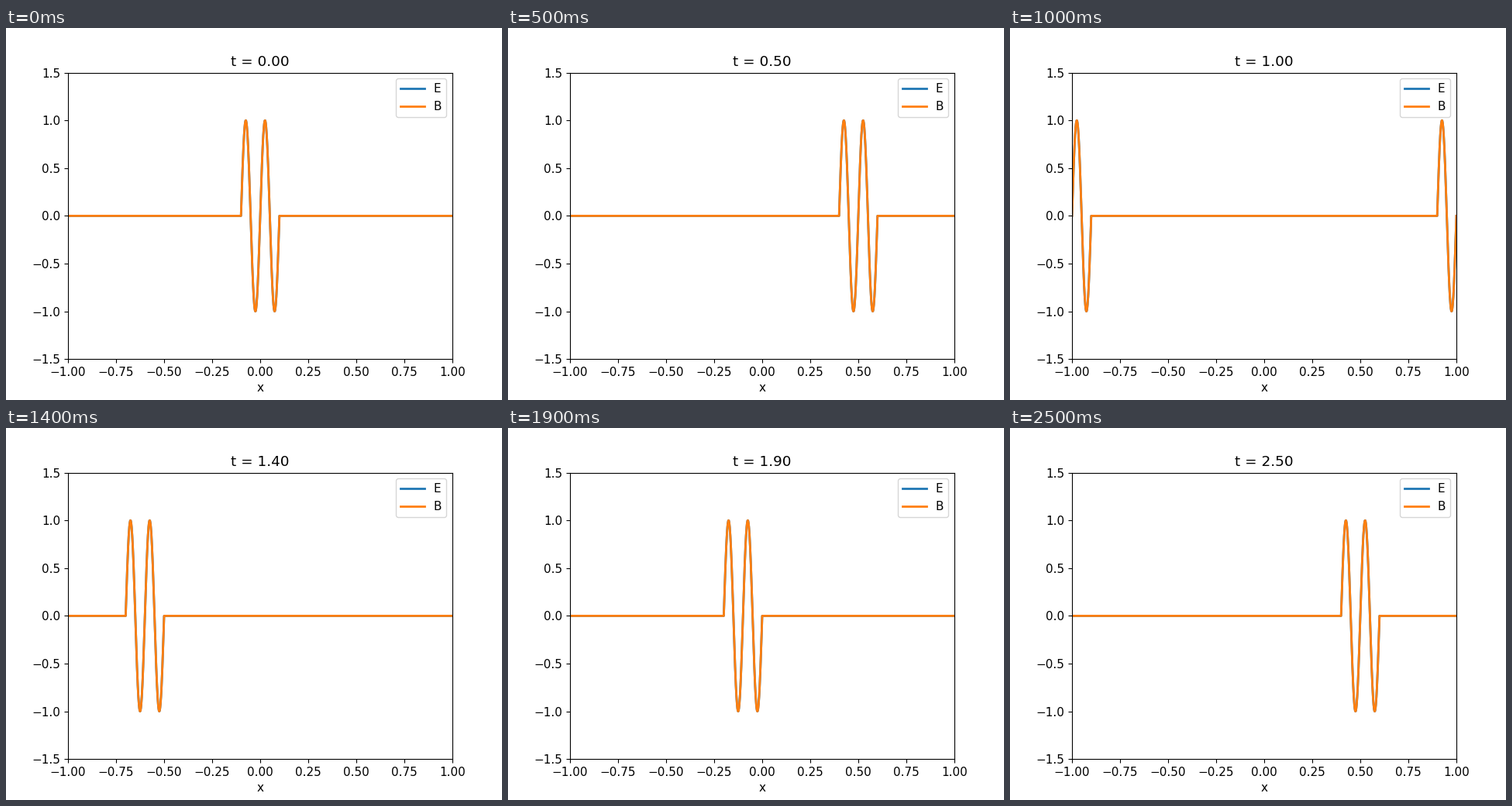
These frames come from a looping animation (640x480 px, 2.6 s). A matplotlib script:

```python
import numpy as np
import matplotlib.pyplot as plt
from matplotlib.animation import FuncAnimation

plt.rcParams.update({"font.family": "DejaVu Sans", "font.size": 11})

FRAMES = 26
INTERVAL = 100  # ms
DT = 0.1        # simulated time per frame
HALF_WIDTH = 0.1

x = np.linspace(-1, 1, 2001)


def pulse(t):
    """Two sine periods moving right at unit speed on a periodic domain."""
    u = (x - t + 1) % 2 - 1
    return np.where(np.abs(u) < HALF_WIDTH, np.sin(2 * np.pi * u / HALF_WIDTH), 0.0)


fig, ax = plt.subplots(figsize=(6.4, 4.8), dpi=100)
lines = [ax.plot(x, pulse(0), lw=2, label=name)[0] for name in ("E", "B")]
ax.set_xlim(-1, 1)
ax.set_ylim(-1.5, 1.5)
ax.set_xlabel("x")
ax.legend(loc="upper right")
title = ax.set_title("t = 0.00")


def update(frame):
    t = frame * DT
    for line in lines:
        line.set_ydata(pulse(t))
    title.set_text(f"t = {t:.2f}")
    return [*lines, title]


anim = FuncAnimation(fig, update, frames=FRAMES, interval=INTERVAL,
                     repeat=True, repeat_delay=0, blit=False)
plt.show()
```
